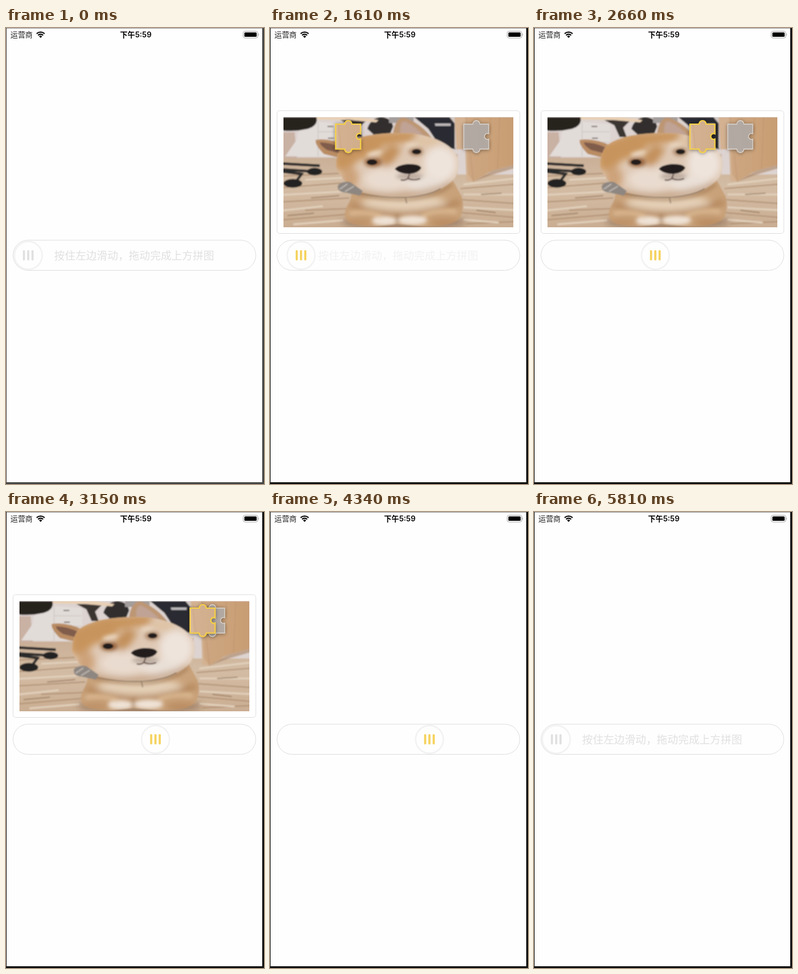
An HTML page for the animation above (5880 ms loop, 440 px wide and 778 px high).

```html
<!DOCTYPE html>
<html lang="zh-CN">
<head>
<meta charset="utf-8">
<title>滑动拼图验证</title>
<style>
@property --x { syntax: "<number>"; inherits: true; initial-value: 0; }

html, body { margin: 0; width: 100%; height: 100%; overflow: hidden; background: #fff; }
svg.stage { display: block; width: 440px; height: 778px; animation: drag 5.88s infinite; }
text { font-family: Inter, "Noto Sans CJK SC", "Noto Sans CJK", sans-serif; }

/* 84 ticks of 70 ms per loop */
.knob, .piece { transform: translateX(calc(var(--x) * 1px)); }
.hint { opacity: calc(1 - var(--x) / 25); }
.panel { animation: panel 5.88s infinite; }
.bars { animation: bars 5.88s step-end infinite; }
.edge { animation: edge 5.88s step-end infinite; }

@keyframes drag {
  0% { --x: 0; animation-timing-function: step-end; }
  23.8095% { --x: 0; animation-timing-function: steps(3); }
  27.381% { --x: 15; animation-timing-function: steps(7); }
  35.7143% { --x: 93; animation-timing-function: steps(8); }
  45.2381% { --x: 169; animation-timing-function: steps(7); }
  53.5714% { --x: 217; animation-timing-function: steps(7); }
  61.9048% { --x: 230; animation-timing-function: steps(7); }
  70.2381% { --x: 234; animation-timing-function: step-end; }
  73.8095% { --x: 234; animation-timing-function: steps(3); }
  77.381%, 100% { --x: 0; }
}
@keyframes panel {
  0% { opacity: 0; animation-timing-function: step-end; }
  16.6667% { opacity: 0; animation-timing-function: steps(5); }
  22.619% { opacity: 1; animation-timing-function: step-end; }
  70.2381% { opacity: 1; animation-timing-function: steps(3); }
  73.8095%, 100% { opacity: 0; }
}
@keyframes bars {
  0% { fill: #e0e0e0; }
  17.8571% { fill: #f5d25c; }
  77.381%, 100% { fill: #e0e0e0; }
}
@keyframes edge {
  0% { fill: #454545; }
  17.8571%, 100% { fill: #111; }
}
</style>
</head>
<body>
<svg class="stage" viewBox="0 0 440 778">
  <defs>
    <clipPath id="frame"><rect x="23" y="152" width="392" height="188"/></clipPath>
    <path id="jigsaw" d="M-21-21H-5.5A6 6 0 0 1 6.5-21H21.5V-4.5A5 5 0 1 0 21.5 4.5V21.5H6.5A6 6 0 0 1-5.5 21.5H-21Z"/>
    <clipPath id="cut"><use href="#jigsaw"/></clipPath>
    <path id="head" d="M124 200Q140 189 163 184Q205 177 245 180Q290 187 310 206Q321 216 322 231Q322 254 306 265Q283 283 240 288Q190 289 152 279Q119 260 112 236Q113 214 124 200Z"/>
    <path id="torso" d="M139 270Q141 290 132 303Q122 322 134 331Q150 339 180 338L217 335L260 338Q310 340 324 324Q332 308 327 288L311 258Z"/>
    <clipPath id="inHead"><use href="#head"/></clipPath>
    <clipPath id="inTorso"><use href="#torso"/></clipPath>
    <filter id="soft" x="-5%" y="-5%" width="110%" height="110%"><feGaussianBlur stdDeviation="1"/></filter>
    <filter id="haze" x="-50%" y="-50%" width="200%" height="200%"><feGaussianBlur stdDeviation="6"/></filter>
    <filter id="mist" x="-50%" y="-50%" width="200%" height="200%"><feGaussianBlur stdDeviation="3"/></filter>
    <filter id="shade" x="-40%" y="-40%" width="180%" height="180%">
      <feDropShadow dx="0" dy="1" stdDeviation="3" flood-color="#000" flood-opacity=".45"/>
    </filter>
    <linearGradient id="floor" x2="0" y2="1">
      <stop stop-color="#c9ae95"/><stop offset=".4" stop-color="#d3bca4"/><stop offset="1" stop-color="#c9ac90"/>
    </linearGradient>
    <linearGradient id="wood">
      <stop stop-color="#cda783"/><stop offset=".5" stop-color="#cba279"/><stop offset="1" stop-color="#c79c73"/>
    </linearGradient>

    <g id="photo" clip-path="url(#frame)"><g filter="url(#soft)">
      <path fill="#ddd3d0" d="M15 145H425V350H15Z"/>
      <path fill="url(#floor)" d="M15 221H140V215H320V250H425V350H15Z"/>
      <g fill="none" stroke-width="1.5">
        <path stroke="#a98769" d="M15 253L140 247M15 273L130 264M15 297L135 290M60 311L135 308M15 328L130 318M325 274L425 266M328 293L425 300M326 315L425 324M335 334L425 330"/>
        <path stroke="#e2d1bd" stroke-width="3" d="M60 259L135 255M15 285L125 279M15 312L90 304M40 335L125 328M330 267L425 256M330 284L425 284M330 306L425 311M330 327L390 332"/>
        <path stroke="#94755a" d="M70 290L118 286M30 320L75 316M360 284L395 282M352 311L385 315"/>
      </g>
      <!-- desk and cabinet -->
      <path fill="#c9b1a3" d="M15 178H42L46 222H15Z"/>
      <path fill="#e2dcd9" d="M50 168L82 160L130 164V219H26L46 190Z"/>
      <path fill="none" stroke="#c6beb9" d="M82 177H129M82 195H129M82 161V219"/>
      <path fill="#6f6864" d="M98 167H108V169H98ZM99 187H109V189H99Z"/>
      <path fill="#3a3431" d="M120 157H165L152 170L158 186H146L137 166Z"/>
      <path fill="#332f2f" d="M166 172Q172 153 190 152Q207 153 210 168L204 183H178Z"/>
      <path fill="#e9d0b4" d="M76 152H150L185 157L181 161L134 157L80 156Z"/>
      <path fill="#a39d9b" d="M203 152H245V162H203Z"/>
      <path fill="#2b2b31" d="M246 152H309L316 160V207L300 203L284 193L270 172Z"/>
      <path fill="#bdb9bb" d="M281 163H308V167H282Z"/>
      <path fill="#d3c8c2" d="M306 152H320V210L315 205V163Z"/>
      <path fill="#d3b191" d="M315 152H337L347 262L335 261L333 207L318 207Z"/>
      <path fill="url(#wood)" d="M333 152H425V231L378 244Q365 250 347 262L338 250Z"/>
      <path fill="none" stroke="#b88e68" opacity=".7" d="M334 152L347 262M376 152L374 205M392 152L388 240"/>
      <path fill="#a98463" opacity=".6" d="M347 262L378 244L425 231V237L380 250Z"/>
      <!-- chair -->
      <path fill="#28221f" d="M15 152H79Q83 166 65 172Q40 178 15 174Z"/>
      <path fill="none" stroke="#2b292a" stroke-width="4.5" d="M15 231L85 235M15 241L76 245M15 244L54 249L42 265"/>
      <g fill="#242223"><ellipse cx="76" cy="245" rx="13" ry="6.5"/><ellipse cx="39" cy="265" rx="16" ry="7.5"/></g>
      <!-- dog -->
      <ellipse cx="228" cy="331" rx="106" ry="11" fill="#6f5038" opacity=".55" filter="url(#haze)"/>
      <use href="#torso" fill="#c9a27a"/>
      <g clip-path="url(#inTorso)"><g filter="url(#haze)">
        <ellipse cx="228" cy="298" rx="72" ry="15" fill="#e4cfb6"/>
        <path fill="none" stroke="#ad7f54" stroke-width="8" d="M136 302Q185 318 218 318Q275 318 325 296"/>
        <ellipse cx="150" cy="333" rx="26" ry="8" fill="#bd9168"/>
        <ellipse cx="300" cy="333" rx="28" ry="8" fill="#b98b60"/>
      </g><g filter="url(#mist)">
        <ellipse cx="195" cy="329" rx="21" ry="8" fill="#efe3d7"/>
        <ellipse cx="243" cy="328" rx="25" ry="8" fill="#efe3d7"/>
        <path fill="none" stroke="#d9b68f" stroke-width="8" d="M136 316Q165 312 190 321M318 313Q285 310 260 320"/>
        <path fill="none" stroke="#98704b" stroke-width="3" d="M217 318V336M150 283Q195 294 238 292Q285 288 310 266"/>
      </g></g>
      <path fill="#b98c64" d="M129 224L92 215Q76 199 78 191Q101 187 132 201Z"/>
      <path fill="#805c4c" d="M120 214L97 208Q85 200 85 195Q104 195 124 205Z"/>
      <path fill="#bd9673" d="M209 186Q212 154 228 152Q257 162 278 190Z"/>
      <path fill="#c0a394" d="M222 181Q220 160 230 159Q248 167 262 183Z" filter="url(#soft)"/>
      <use href="#head" fill="#dfc9b5"/>
      <g clip-path="url(#inHead)"><g filter="url(#haze)">
        <path fill="#c8945d" d="M108 200L165 178L255 175L240 194L195 200L180 218L150 226L128 248L110 240Z"/>
        <path fill="#c3905c" d="M183 220L205 200L225 205L212 226L196 240Z"/>
        <ellipse cx="136" cy="256" rx="15" ry="20" fill="#cda37a"/>
        <ellipse cx="290" cy="232" rx="28" ry="30" fill="#eee4dc"/>
        <ellipse cx="200" cy="258" rx="40" ry="20" fill="#e9dbcf"/>
        <ellipse cx="262" cy="264" rx="35" ry="14" fill="#eae0d7"/>
        <ellipse cx="268" cy="194" rx="22" ry="9" fill="#dfc3a4"/>
        <path fill="none" stroke="#b99370" stroke-width="7" d="M146 281Q225 298 310 266"/>
      </g><g filter="url(#mist)">
        <ellipse cx="178" cy="214" rx="14" ry="4" fill="#ecdac6" transform="rotate(-12 178 214)"/>
        <ellipse cx="241" cy="200" rx="11" ry="4" fill="#e9d5be"/>
        <ellipse cx="176" cy="229" rx="15" ry="8" fill="#95643c"/>
        <ellipse cx="249" cy="211" rx="12" ry="7" fill="#a57e5d"/>
        <ellipse cx="238" cy="253" rx="23" ry="5" fill="#b7a69a"/>
      </g></g>
      <g fill="#241c1a"><ellipse cx="174" cy="229" rx="9" ry="5"/><ellipse cx="250" cy="211" rx="8" ry="4.5"/></g>
      <path fill="#211d1f" d="M213 241Q216 234 236 232Q256 232 258 239Q253 248 237 249Q222 249 213 241Z"/>
      <path fill="none" stroke="#5a463f" stroke-width="2" d="M238 249L235 257Q229 261 223 259M236 257Q245 261 256 257"/>
      <path fill="none" stroke="#8c7763" stroke-width="1.6" d="M151 282Q190 290 231 289Q269 287 291 274M231 289L233 299"/>
      <path fill="#8d8681" d="M116 268Q126 260 137 263L158 278L153 286L130 281Q113 280 116 268Z"/>
      <path fill="none" stroke="#c4bdb7" stroke-width="2" d="M119 275L132 266M128 279L143 270"/>
    </g></g>
  </defs>

  <rect width="440" height="778" fill="#fefefe"/>

  <!-- status bar -->
  <text x="7.5" y="16" font-size="12.7" fill="#222">运营商</text>
  <g fill="none" stroke="#000" stroke-width="2.1">
    <path d="M52.2 9.8A9.8 9.8 0 0 1 65.8 9.8M54.7 12.4A6.2 6.2 0 0 1 63.3 12.4"/>
    <path fill="#000" stroke="none" d="M56.4 14.2A3.8 3.8 0 0 1 61.6 14.2L59 17Z"/>
  </g>
  <text x="221.3" y="16" font-size="12.8" font-weight="600" text-anchor="middle">下午5:59</text>
  <rect x="404.5" y="5.5" width="25" height="11.5" rx="3" fill="none" stroke="#aaa"/>
  <rect x="406.5" y="7.5" width="21" height="7.5" rx="1.5"/>
  <path fill="#aaa" d="M430.5 9Q432.5 11.2 430.5 13.5Z"/>

  <g class="panel">
    <rect x="12" y="141" width="414" height="209.5" rx="4.5" fill="#fff" stroke="#dedede"/>
    <use href="#photo"/>
    <g transform="translate(351.5 185)">
      <use href="#jigsaw" fill="#b3aca6" fill-opacity=".92" stroke="#d8d4cf" stroke-width="1.3" filter="url(#shade)"/>
    </g>
    <g class="piece"><g transform="translate(118 185)" filter="url(#shade)">
      <g clip-path="url(#cut)"><use href="#photo" transform="translate(-352 -185)"/></g>
      <use href="#jigsaw" fill="#fff" fill-opacity=".12" stroke="#f6cf45" stroke-width="2.2"/>
    </g></g>
  </g>

  <!-- slider -->
  <rect x="12" y="362" width="414" height="51.5" rx="25.7" fill="#fefefe" stroke="#dedede"/>
  <text class="hint" x="82" y="394.5" font-size="18.2" fill="#e0e0e0">按住左边滑动，拖动完成上方拼图</text>
  <g class="knob">
    <circle cx="38" cy="388" r="23.7" fill="#fefefe" stroke="#f2f2f2" stroke-width="2.5"/>
    <g class="bars">
      <rect x="28.8" y="379" width="3.6" height="17.5" rx="1.5"/>
      <rect x="36.1" y="379" width="3.6" height="17.5" rx="1.5"/>
      <rect x="43.4" y="379" width="3.6" height="17.5" rx="1.5"/>
    </g>
  </g>

  <!-- window edges -->
  <rect width="440" height="1" fill="#999"/>
  <path class="edge" d="M0 0H1V775H437V0H440V778H0Z"/>
</svg>
</body>
</html>
```
